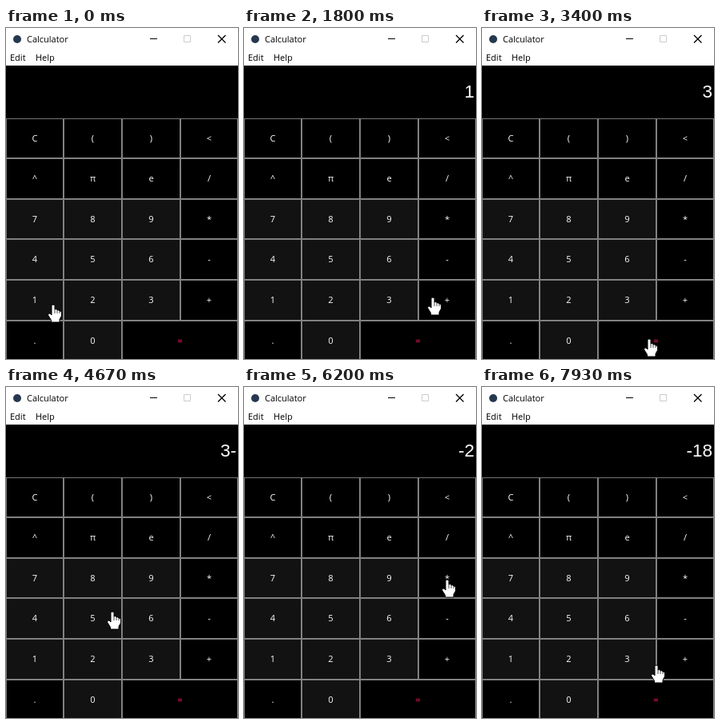
An HTML page that plays this animation: 290 by 414 pixels, repeating every 8 s.

```html
<!DOCTYPE html>
<html lang="en">
<head>
<meta charset="utf-8">
<title>Calculator</title>
<style>
  html, body { margin: 0; width: 100%; height: 100%; overflow: hidden; background: #000; }
  #app {
    position: relative; width: 290px; height: 414px; overflow: hidden;
    background: #000; font: 500 11px "Open Sans", "Noto Sans", sans-serif;
  }
  #app > * { position: absolute; }
  .bar { left: 0; top: 0; width: 290px; height: 47px; background: #fff; }
  .label { color: #000; line-height: 16px; }
  #out {
    right: 2px; top: 68px; line-height: 24px; color: #fff; white-space: pre;
    font-family: "Liberation Sans", Arial, sans-serif; font-size: 22.5px; font-weight: 400;
  }
  .key {
    box-sizing: border-box; border: 1px solid; border-color: #777 #8a8a8a #8a8a8a #777;
    color: #fff; background: #000; text-align: center; line-height: 48px;
  }
  .digit { background: #121212; }
  .equals { color: #e0164a; font-weight: 600; }
  .down { background: #f0f0f0; color: #000; }
  svg { left: 0; top: 0; }
</style>
</head>
<body>
<div id="app">
  <div class="bar"></div>
  <div class="label" style="left:26px;top:6px">Calculator</div>
  <div class="label" style="left:5px;top:29px">Edit</div>
  <div class="label" style="left:37px;top:29px">Help</div>
  <div id="out"></div>
  <svg id="art" width="290" height="414">
    <circle cx="14" cy="14" r="5" fill="#26384f"/>
    <g fill="none" stroke="#000">
      <path d="M180 13.500h9"/>
      <path d="M222.500 9.500h8v8h-8z" stroke="#ccc"/>
      <path d="M265 9l9.500 9.500M274.500 9l-9.500 9.500" stroke-width="1.300"/>
    </g>
    <g id="hand" stroke="#000" stroke-linejoin="round">
      <path fill="#fff" d="M-2 1.500Q-2 0 0 0Q2 0 2 1.500V6Q3 5 5 6V7Q7 6 8 8Q10.500 7.500 10.500 10V14L8 18.500V22H-2.500V19.500L-6.500 13Q-6.500 10.500-4 11L-2 13Z"/>
      <path fill="none" stroke-width=".7" d="M2 6v5M5 7v4M8 8v3"/>
    </g>
  </svg>
</div>
<script>
  const FPS = 15, LOOP = 120;
  const [app, art, out, hand] = ["app", "art", "out", "hand"].map(id => document.getElementById(id));

  // Keypad on an even grid
  const colX = c => Math.min(290, Math.floor(72.8 * c));
  const rowY = r => Math.floor(113 + 50.6 * r);
  const keys = {};
  ["C()<", "^πe/", "789*", "456-", "123+", ".0="].forEach((row, r) => [...row].forEach((ch, c) => {
    const el = document.createElement("div");
    const x = colX(c), y = rowY(r);
    const w = colX(ch === "=" ? 4 : c + 1) - x, h = rowY(r + 1) - y;
    el.className = "key" + (/\d/.test(ch) ? " digit" : ch === "=" ? " equals" : "");
    el.textContent = ch;
    el.style.cssText = `left:${x}px;top:${y}px;width:${w}px;height:${h}px`;
    app.insertBefore(el, art);
    keys[ch] = { el, x: x + w / 2, y: y + h / 2 };
  }));

  // Stops of the pointer: key, beat of the press, offset from the key's centre
  const stops = [
    ["1", 18, 23, 5], ["+", 31, -17, -4], ["2", 41, 4, 15], ["=", 49, -9, -2],
    ["-", 64, 7, -3], ["5", 73, 24, -9], ["=", 81, -8, -2], ["*", 94, 0, 2],
    ["9", 102, 5, 5], ["=", 110, -1, -5], ["=", 115, -1, 0, "hover"], ["3", 121, 36, 7, "hover"]
  ].map(([ch, beat, dx, dy, hover]) =>
    ({ ch, beat, hover, x: keys[ch].x + dx, y: keys[ch].y + dy }));

  function solve(sum) {
    const [, a, op, b] = sum.match(/(-?\d+)(\D)(\d+)/);
    return String({ "+": +a + +b, "-": a - b, "*": a * b }[op]);
  }

  // Quick start, soft landing
  function ease(u) {
    const v = 1 - (1 - u) ** 2;
    return v * v * (3 - 2 * v);
  }

  // Leave two beats after a press, arrive two beats before the next
  function pointAt(beat) {
    let { x, y } = stops[0];
    for (let i = 1; i < stops.length; i++) {
      const from = stops[i - 1], to = stops[i];
      const start = from.beat + 2, end = to.beat - 2;
      const e = ease(Math.min(1, Math.max(0, (beat - start) / (end - start))));
      x += (to.x - from.x) * e;
      y += (to.y - from.y) * e;
    }
    return [Math.round(x), Math.round(y)];
  }

  function draw(ms) {
    const beat = Math.floor((ms + 4) * FPS / 1000) % LOOP;
    let text = "", held = "";
    for (const s of stops) {
      if (s.hover) continue;
      if (beat > s.beat) text = s.ch === "=" ? solve(text) : text + s.ch;
      else if (beat === s.beat) held = s.ch;
    }
    out.textContent = text;
    for (const ch in keys) keys[ch].el.classList.toggle("down", ch === held);
    hand.setAttribute("transform", `translate(${pointAt(beat)})`);
  }

  const start = performance.now();
  function tick() {
    draw(performance.now() - start);
    requestAnimationFrame(tick);
  }
  tick();
</script>
</body>
</html>
```
